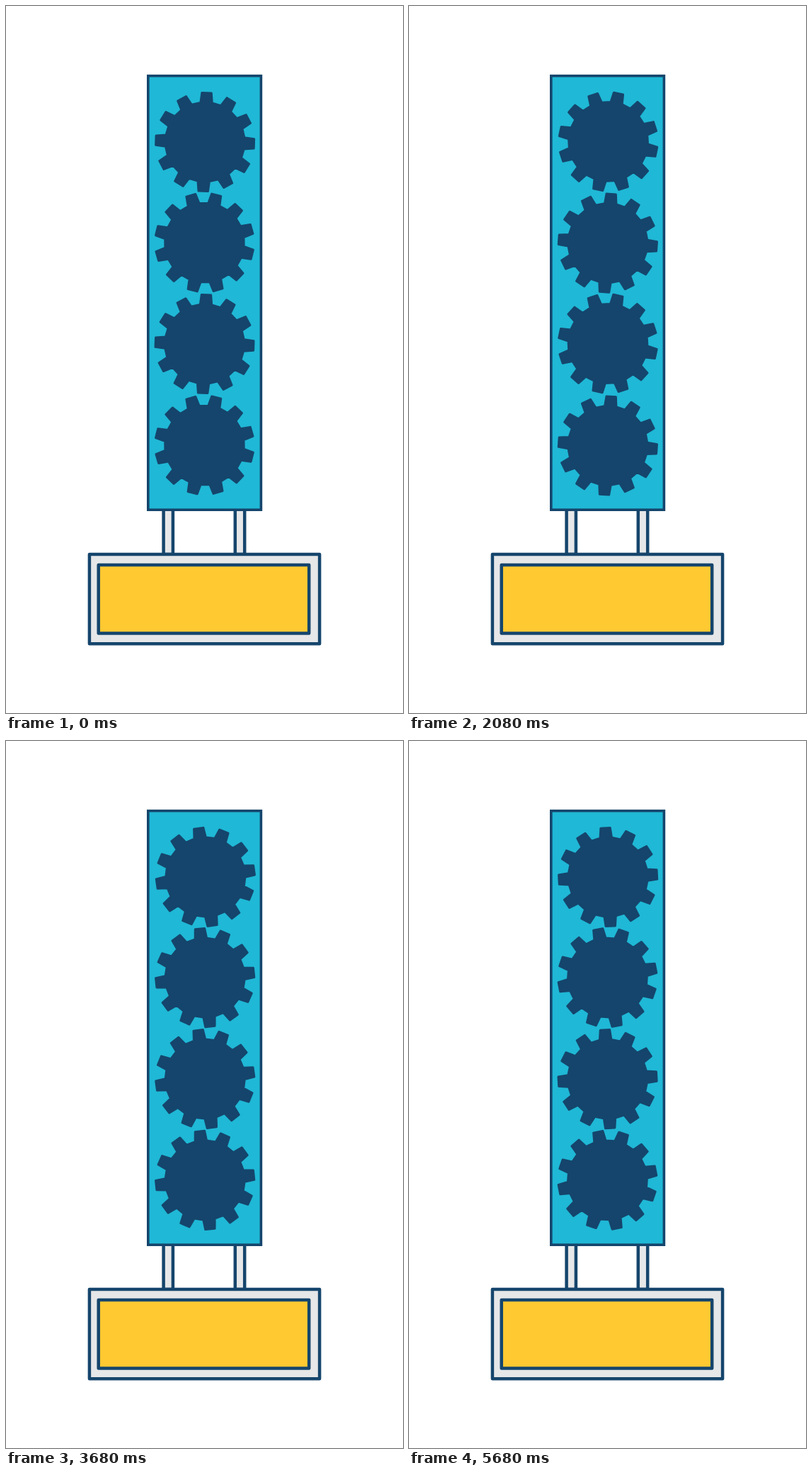
Animation, 561 px wide and 998 px high, one loop 5760 ms. Source, as an HTML page:

```html
<!DOCTYPE html>
<html lang="en">
<head>
<meta charset="utf-8">
<title>Gear tower</title>
<style>
  html, body { margin: 0; width: 100%; height: 100%; overflow: hidden; background: #fff; }
  svg { display: block; width: 561px; height: 998px; }
</style>
</head>
<body>
<svg viewBox="0 0 561 998" stroke="#15456c" stroke-width="4.5" stroke-linejoin="round">
  <g fill="#e6e7e8">
    <rect x="222.6" y="705" width="13.3" height="69"/>
    <rect x="323.8" y="705" width="13.4" height="69"/>
    <rect x="117.9" y="774.1" width="325.2" height="126.2"/>
  </g>
  <rect x="130.7" y="788.9" width="297.5" height="96.6" fill="#ffc932"/>
  <rect x="200.8" y="98.6" width="159.6" height="612.6" fill="#1fb8d6" stroke-width="3.6" stroke-linejoin="miter"/>
  <g id="gears" fill="#15456c" stroke-width="3"></g>
</svg>
<script>
const TEETH = 12, STEP_MS = 80, STEP_DEG = 5, LOOP_STEPS = 72;
const TOOTH = [[-8.2, -55.4], [-6.7, -69.3], [6.7, -69.3], [8.2, -55.4]];

// dir: 1 turns clockwise, -1 counterclockwise
const gears = [
  { x: 281.5, y: 191.8, start: 2, dir: 1 },
  { x: 280.8, y: 334.2, start: 14, dir: -1 },
  { x: 280.9, y: 476.9, start: 2, dir: 1 },
  { x: 280.8, y: 620.1, start: 14, dir: -1 },
];

function gearPoints() {
  const points = [];
  for (let i = 0; i < TEETH; i++) {
    const a = i * 2 * Math.PI / TEETH, c = Math.cos(a), s = Math.sin(a);
    for (const [x, y] of TOOTH) points.push([x * c - y * s, x * s + y * c]);
  }
  return points.join(" ");
}

const shape = gearPoints();
for (const gear of gears) {
  gear.node = document.createElementNS("http://www.w3.org/2000/svg", "polygon");
  gear.node.setAttribute("points", shape);
  document.getElementById("gears").append(gear.node);
}

function draw(now) {
  const turn = Math.floor(now / STEP_MS + 1e-6) % LOOP_STEPS * STEP_DEG;
  // Each gear sits slightly off its axle
  for (const { node, x, y, start, dir } of gears) {
    node.setAttribute("transform",
      `translate(${x} ${y}) rotate(${dir * turn}) translate(-.35 ${dir * 0.2}) rotate(${start})`);
  }
  requestAnimationFrame(draw);
}
draw(performance.now());
</script>
</body>
</html>
```
